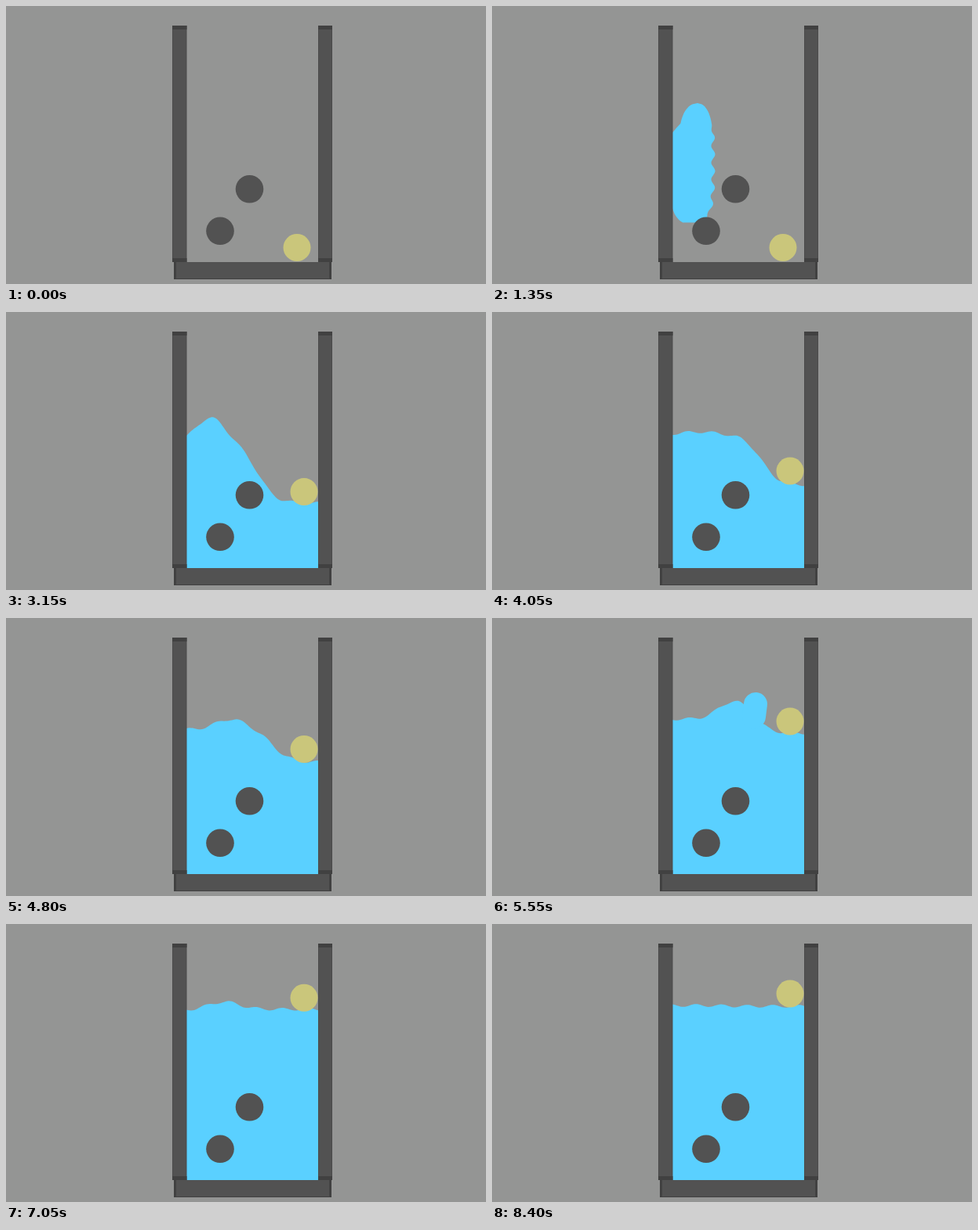
These frames come from a looping animation (612x355 px, 8550 ms). An HTML page with a canvas:

```html
<!DOCTYPE html>
<html lang="en">
<head>
<meta charset="utf-8">
<title>Filling tank</title>
<style>
  html, body { margin: 0; width: 100%; height: 100%; overflow: hidden; background: #949594; }
  canvas { display: block; }
</style>
</head>
<body>
<canvas id="stage" width="612" height="355"></canvas>
<script>
const ctx = document.getElementById('stage').getContext('2d');
const LOOP = 8550, STEP = 150, START = 750, SPREAD = 1650;
const WATER = '#5ad0ff', BACK = '#949594', DARK = '#525252', EDGE = '#414141';
const mix = (a, b, u) => a + (b - a) * u;
const clamp = u => Math.max(0, Math.min(1, u));

// time, ball height, water level left and right, x of the step between, mound x and height
const keys = [
  [SPREAD, 306, 165, 322, 288, 258, 28],
  [2400, 258, 183, 298, 305, 259, 12],
  [3000, 234, 172, 248, 318, 260, 40],
  [4050, 203, 156, 221, 343, 265, 3],
  [5550, 132, 129, 147, 338, 310, 24],
  [6150, 80.5, 126, 117, 300, 342, 18],
  [6600, 96, 112, 110, 300, 270, 14],
  [8400, 89, 104, 105, 300, 300, 0]
];

// Splashes rise out of the water and sink back around their peak time
const splashes = [
  { peak: 2400, from: [290, 210], to: [305, 212], radius: 10 },
  { peak: 2400, from: [312, 222], to: [326, 217.5], radius: 7.3, free: true },
  { peak: 2400, from: [398, 295], to: [396, 278], radius: 10 },
  { peak: 5550, from: [334, 126], to: [336, 110], radius: 15 },
  { peak: 6150, from: [300, 100], to: [282, 72], radius: 20 }
];

function fillShape(points, color) {
  ctx.fillStyle = color;
  ctx.beginPath();
  points.forEach(([x, y]) => ctx.lineTo(x, y));
  ctx.fill();
}

function capsule([x0, y0], [x1, y1], radius, color) {
  ctx.strokeStyle = color;
  ctx.lineWidth = 2 * radius;
  ctx.lineCap = 'round';
  ctx.beginPath();
  ctx.moveTo(x0, y0);
  ctx.lineTo(x1, y1);
  ctx.stroke();
}

function disc(x, y, r, color) {
  ctx.fillStyle = color;
  ctx.beginPath();
  ctx.arc(x, y, r, 0, 2 * Math.PI);
  ctx.fill();
}

function rect(x, y, w, h, color) {
  ctx.fillStyle = color;
  ctx.fillRect(x, y, w, h);
}

// Falling column with a lumpy right side that leans against the left wall
function drawPour(t) {
  const length = 154 * mix(0.2, 1, (t - START) / 600);
  const left = [], right = [];
  for (let v = -1; v <= 1; v += 0.02) {
    const y = 124 + length * (v + 1) / 2;
    const round = Math.sqrt(Math.max(0, 1 - v ** 4));
    const lean = 12 * clamp((y - 150) / 16);
    const lump = clamp((y - 150) / 15) * 2.5 * Math.cos((y - 168) / 3.4);
    left.unshift([262 - 24 * round - lean, y]);
    right.push([262 + (20 + lump) * round, y]);
  }
  fillShape([...right, ...left], WATER);
}

function drawSplash({ peak, from, to, radius, free }, t) {
  const u = clamp(1 - Math.abs(t - peak) / 450);
  if (!u) return;
  const tip = [mix(from[0], to[0], u), mix(from[1], to[1], u)];
  capsule(free ? tip : from, tip, radius * Math.sqrt(u), WATER);
}

function drawWater(t, left, right, stepX, moundX, moundHeight) {
  const surface = [];
  for (let x = 222; x <= 406; x += 2) {
    const step = 1 / (1 + Math.exp((stepX - x) / 11));
    const mound = moundHeight * Math.exp(-(((x - moundX) / 28) ** 2));
    const ripple = 1.8 * Math.cos((x - 260) / 5.2 + (t - 8400) / 260);
    surface.push([x, mix(left, right, step) - mound - ripple]);
  }
  fillShape([...surface, [406, 338], [222, 338]], WATER);
  splashes.forEach(splash => drawSplash(splash, t));
  // Air pocket behind the lower post
  if (Math.abs(t - 2400) < 300) fillShape([[285, 283], [300, 291], [278, 305]], BACK);
}

function drawTank() {
  for (const [x, w] of [[212, 18.5], [398, 18]]) {
    rect(x, 25, w, 302, '#4b4b4b');
    rect(x + 1, 25, w - 2, 302, DARK);
    rect(x, 25, w, 5, EDGE);
    rect(x, 322, w, 5, EDGE);
  }
  rect(214, 327, 201, 22, EDGE);
  rect(217, 327, 195, 21, DARK);
}

function draw(now) {
  const t = Math.floor(now % LOOP / STEP) * STEP;
  let ballY = 308.5;
  rect(0, 0, 612, 355, BACK);
  if (t >= SPREAD) {
    const next = Math.max(1, keys.findIndex(key => key[0] >= t));
    const from = keys[next - 1], to = keys[next];
    const u = (t - from[0]) / (to[0] - from[0]);
    const [, height, ...shape] = from.map((value, i) => mix(value, to[i], u));
    ballY = height;
    drawWater(t, ...shape);
  } else if (t >= START) {
    drawPour(t);
  }
  disc(310.5, 233.8, 17.8, DARK);
  disc(273, 287.3, 17.8, DARK);
  const drift = clamp((t - 1500) / 1500);
  disc(371 + 9 * (1 - (1 - drift) ** 2), ballY, 17.5, '#cac67b');
  drawTank();
}

const begin = performance.now();
function tick() {
  draw(performance.now() - begin);
  requestAnimationFrame(tick);
}
tick();
</script>
</body>
</html>
```
